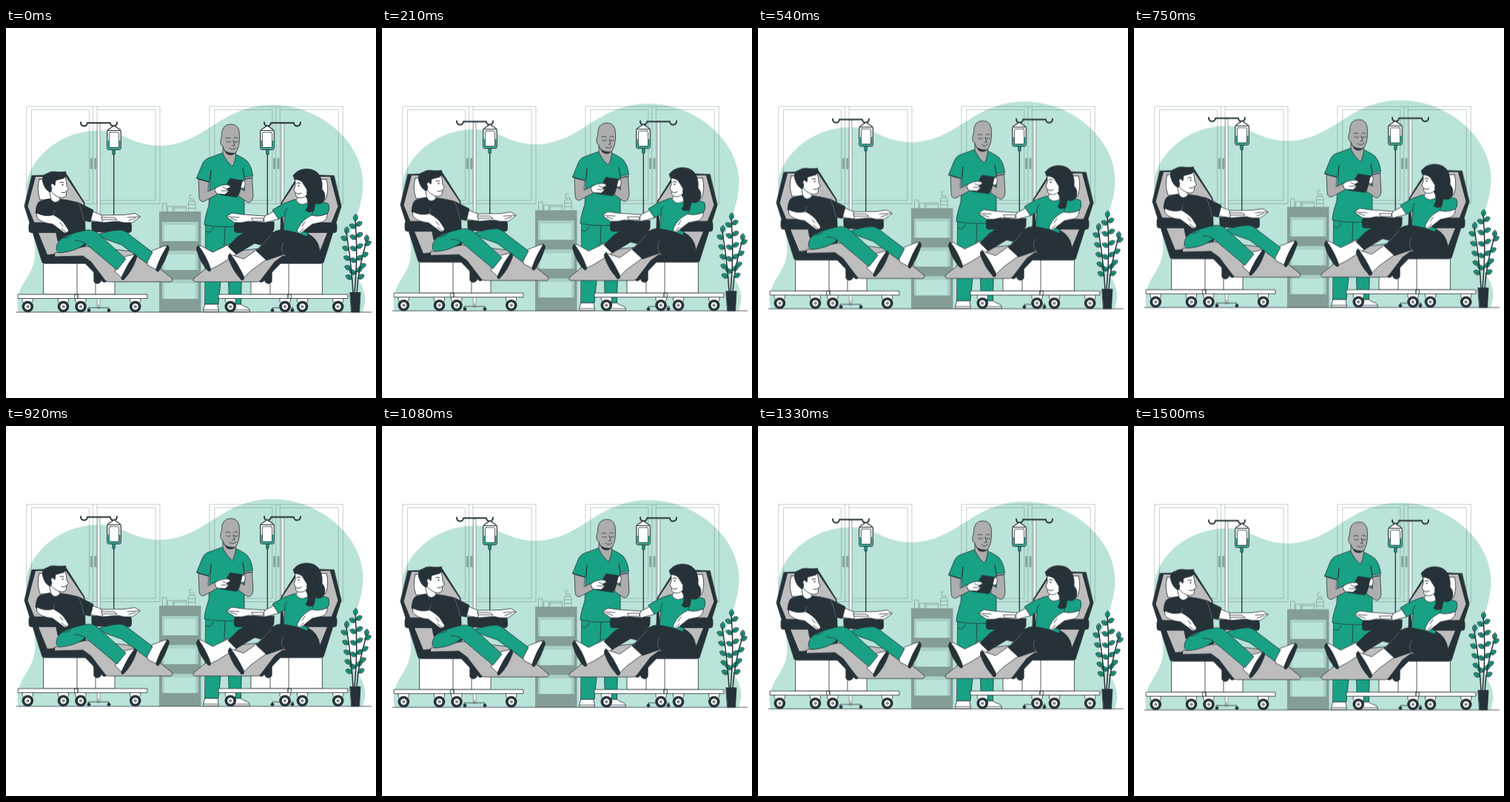
These frames come from a looping animation (500 px wide and 500 px high, 1.54 s). An HTML page:

```html
<!DOCTYPE html>
<html lang="en">
<head>
<meta charset="utf-8">
<title>Blood donation</title>
<style>
  html, body { margin: 0; width: 100%; height: 100%; overflow: hidden; background: #fff; }
  svg { display: block; width: 100%; height: 100%; }
  .bob { animation: bob 770ms linear infinite alternate; }
  @keyframes bob { from { transform: translateY(0); } to { transform: translateY(-6.5px); } }
  .art { stroke: #263238; stroke-width: .8; stroke-linejoin: round; stroke-linecap: round; }
  .d { fill: #263238; }
  .g { fill: #18a184; }
  .w { fill: #fff; }
  .s { fill: #bdbdbd; }
  .k { fill: #adadad; }
  .n { fill: none; }
  .flat { stroke: none; }
  .cabinet { fill: none; stroke: #263238; stroke-opacity: .27; stroke-width: .9; }
  .cart { fill: #849d96; }
  .items { fill: none; stroke: #849d96; stroke-width: .8; }
</style>
</head>
<body>
<svg viewBox="0 0 500 500">
  <defs>
    <g id="cabinet" class="cabinet">
      <path d="M27.700 106H208V237.500H27.700ZM117.500 106V237.500M123 106V237.500M34.500 110.500H112.500V233H34.500ZM123 110.500H202V233H123"/>
      <path d="M115.300 177V189.500M120.700 177V189.500" stroke-width="3" stroke-linecap="round" stroke-opacity=".36"/>
    </g>

    <g id="caster">
      <path class="w" d="M-7 -11H7V-7L4 -3H-5L-7 -7Z"/>
      <circle r="6" class="w" stroke-width="3.600"/>
      <circle r="1.500" class="s"/>
    </g>

    <g id="stand">
      <path class="w" d="M123.700 129H127V379H123.700Z" stroke="#7b8b88"/>
      <path class="n" d="M101 127.500C101 134 110 134 110 128.300H141C141 134 150 134 150 127.500" stroke-width="1.900"/>
      <path class="n" d="M111 380V378H139V380M125 374V378"/>
      <circle class="d" cx="112" cy="381.500" r="2"/><circle class="d" cx="139" cy="381.500" r="2"/>
      <path class="w" d="M146 132L153.500 137Q155.300 138 155.300 140V161Q155.300 164.500 152.500 164.500H139.500Q136.700 164.500 136.700 161V140Q136.700 138 138.500 137Z" stroke-width="1.200"/>
      <path class="n" d="M138 138.500H154" stroke-width="1"/>
      <path class="g flat" d="M137.500 152H154.500V161Q154.500 163.800 152 163.800H140Q137.500 163.800 137.500 161Z"/>
      <rect class="w" x="139.400" y="141" width="13.200" height="20.500" rx="1.500"/>
      <rect class="g" x="143.800" y="164.500" width="3.600" height="6.500" rx="1"/>
      <path class="n" d="M145.700 171V257" stroke-width="1.300"/>
    </g>

    <g id="chair">
      <path class="d" d="M35 199.500L82 198L106 236L108 304L56 319L49 317L25 241Z"/>
      <path class="s flat" d="M40 201H81L105 237L100 302L57 309L29.500 241Z"/>
      <path class="w" d="M45 204.500H60L70 232H46Q41 218 45 204.500Z"/>
      <path class="w" d="M51 318H147V360H51Z"/>
      <path class="n" d="M96 318V360M121 340V360"/>
      <path class="d" d="M50 307L110 302L137 340Q136 344.500 131 343L107 318H53Z"/>
      <path class="d" d="M119 330L129 336L128 343Q123 348 119 343Z"/>
      <path class="s" d="M66 304L108 295L180 303L224 338Q227 342.500 222 343H139Q136 343 134 341L115 316L104 308L66 309Z"/>
      <path class="d" d="M116 262H167Q169.500 263 169.500 267V273Q169.500 276.500 166 276.500H142L120 275.500Q116 275 116 272Z"/>
      <path class="w" d="M16.500 360H97V365.500H16.500ZM93 360H191V365.500H93Z"/>
      <path class="n" d="M97 360V365.500"/>
      <use href="#caster" x="29.300" y="376.500"/><use href="#caster" x="77.500" y="376.500"/>
      <use href="#caster" x="101" y="376.500"/><use href="#caster" x="174.700" y="376.500"/>
    </g>

    <path id="rest" class="d" d="M31 266Q31 263 34 263H71Q75 263 75 267V273Q75 276.500 72 276.500H34Q31 276.500 31 273Z"/>
  </defs>

  <g class="bob">
    <path fill="#bae3d9" d="M17 384C12 366 20 350 28 338C38 322 40 312 39 296C37 270 28 250 28 215C28 184 66 139 126 138.500C157 138.500 170 159 208 159C270 158 290 104 360 104C425 104 482.500 155 482.500 210C482 250 461 275 461 300C461 330 489 345 485 372L482 384Z"/>
  </g>

  <use href="#cabinet"/>
  <use href="#cabinet" x="247.300"/>

  <g class="bob">
    <!-- trolley -->
    <path fill="#a8cfc5" d="M211 261H259V366H211Z"/>
    <path fill="#bae3d9" d="M214 266H256V288H214ZM214 306H256V327H214ZM214 345H256V366H214Z"/>
    <path class="cart" d="M207 248H263.500V384H207ZM211 262V288H259.500V262ZM211 301V327H259.500V301ZM211 340V366H259.500V340Z" fill-rule="evenodd"/>
    <path class="items" d="M211.500 248V237H217V248M218.500 248V241H225.500V248M227 248V241H243.500V248M227 243H243.500M246.500 247V236Q246.500 234 248.500 234H254Q256 234 256 236V247M249 234V231H254V234M248 231V226H252M246.500 238.500H256M246.500 243.500H256"/>

    <g class="art">
      <path class="n" d="M14 384H493.500"/>
      <use href="#stand"/>
      <use href="#stand" transform="translate(499 0) scale(-1 1)"/>

      <!-- nurse -->
      <g>
        <path class="w" d="M269 373H286L287.500 383.500H266.500Q266.500 379 269 373ZM304 373H317Q320 376 327 378Q329.500 380 329.500 383.500H304Z"/>
        <path class="n" d="M267 381H287M305 381H329"/>
        <path class="g" d="M270 262H320L317.500 373H301.500L299 293H295L287 373H269Z"/>
        <path class="n" d="M296 268L295 293M270 275Q277 279 280 270"/>
        <path class="g" d="M292 169L273 176Q267 178 264 187L257.500 203L274 208L276 203L274 240Q268 258 268 266Q294 271 322 267V202L333.500 200Q332 187 326 180Q322 176 311 171Z"/>
        <path class="k" d="M260.500 204.500L274 208L273 221L285 215L289 223L267 234.500Q261 235 261 228ZM322 204.500L332.500 202.500L334 227Q333 236 327 236L314 227L317 217L322 220Z"/>
        <path class="n" d="M276 203L277 192M322 202L320 190M257.500 203L274 208M322 204L333.500 202" stroke-width="1.200"/>
        <path class="k" d="M293 160V170Q299 182 306 187Q310 181 311 166Z"/>
        <path class="k" d="M291.500 146Q291 130 304 130Q316 130 315.500 146Q316 163 309 170Q302 174 295 165L293 160Q289 158 290 152Z"/>
        <path class="d flat" d="M294 164Q300 170 309.500 168.500Q304 174 298 170Z"/>
        <path class="n" d="M297 149Q300 147 303 149M308 148.500Q311 147 313 149M298 153.500Q301 155.500 303.500 153.500M308.500 153.500Q311 155.500 313.500 153.500M307 152L309 159H306M302 162.500Q307 166 311 161.500" stroke-width=".8"/>
        <path class="d" d="M303 203.500L322 206.500L312 228.500L290 225.500Z"/>
        <path class="w" d="M282 217.500Q289 211 301 212L303.500 215L298 217.500L301 220.500L296 225L285 224ZM322 206Q325 211 321 217L317 216L319 208Z"/>
        <path class="n" d="M293 215L298 217.500M291 220H300"/>
      </g>

      <use href="#chair"/>
      <use href="#chair" transform="translate(478 0) scale(-1 1)"/>

      <!-- man -->
      <g>
        <path class="w" d="M112 246L130 253L160 252.500L174 250.500L181.500 255L171 263H159L151 261L132 263L113 260Z"/>
        <path class="n" d="M164 256L180 255M166 260L175 257M129 253Q132 258 130 262.500"/>
        <path class="w" d="M129 256H146L150 259H130Z"/>
        <path class="w" d="M189 309L197 301L214 294.500Q219 294 219 298L206 328L192 321Z"/>
        <path class="d" d="M218 294Q221.500 295 220 300Q215 316 206 329Q202 329 203 325Q208 310 218 294Z"/>
        <path class="g" d="M124 279Q146 272 156 273Q164 275 169 281L198 303L190 318L156 293L136 286Z"/>
        <path class="w" d="M148 322L160 309L173 306Q176 307 175 311L159 340L148 330Z"/>
        <path class="d" d="M174 306Q178 307 176 312Q170 329 159 340Q154 342 157 335Q164 319 174 306Z"/>
        <path class="d" d="M57 231L46 234Q41 236 40 250L45 255L63 253L70 288L106 277L105 260L114 262L118 246L98 236Q83 232 71 231Z"/>
        <path class="g" d="M68 300Q67 290 77 283Q95 275 110 273Q120 272 127 280L162 312L150 327L107 291Q96 302 72 304Z"/>
        <path class="n" d="M107 291Q101 287 93 287M77 284Q85 284 88 280"/>
        <path class="w" d="M58 219L61 232Q66 239 73 232L71 226Z"/>
        <path class="w" d="M60 206Q68 198 80 201Q82 208 82 213L84.500 218L82 220L81 227Q77 231 70 228Q61 224 58 214Z"/>
        <path class="d" d="M49.500 207Q48 198 56 196.500Q61 193 69 194.500Q76 195 80.500 194Q82.500 200 78 203L67 206L66 213L63 210Q59 211 62 217L60 222Q52 219 49.500 207Z"/>
        <path class="n" d="M73 209Q76 207 78 209M75 222Q79 224 81 221" stroke-width="1"/>
        <circle class="d flat" cx="76.500" cy="212" r="1"/>
      </g>
      <use href="#rest"/>
      <path class="w" d="M42 250Q53 256 64 252.500Q76 259 80 266L84.500 273Q84 277 79 277L71 271L63 265Q46 263 42 256Z"/>
      <path class="n" d="M73 263L77 268M75 271L81 276"/>
      <path class="n" d="M98 237Q103 246 105 260M64 253L66 246" stroke="#697478"/>

      <!-- woman -->
      <g>
        <path class="w" d="M368 245L350 254L320 252L305 250L297.500 255L309 263H319L328 261L350 263L369 258Z"/>
        <path class="n" d="M315 256L299 255M312 260L304 257M350 254Q347 258 349 262.500"/>
        <path class="w" d="M332 257H348V261H334Z"/>
        <path class="w" d="M303 292L314 304L287 321L273 328L259 298Q260 293 265 295L279 303Z"/>
        <path class="d" d="M260 294Q256.500 296 258 301Q263 318 273 328Q278 330 276 324Q270 307 260 294Z"/>
        <path class="d" d="M366 276L328 275Q319 277 313 282L300 295L311 306L336 291L360 297Z"/>
        <path class="w" d="M340 299L353 312L331 328L318 341L301 310Q302 305 306 307L321 312Z"/>
        <path class="d" d="M303 305Q299 307 301 312Q307 329 318 340Q323 342 321 335Q313 318 303 305Z"/>
        <path class="d" d="M408 278Q421 284 424 300Q424 311 416 313Q393 315 375 306L352 314L338 301L358 280Q363 272 374 273Z"/>
        <path class="n" d="M376 306Q369 299 375 290M340 300L358 280" stroke="#697478"/>
        <path class="g" d="M389 232Q374 236 360 246L368 258L377 254L375 273Q391 275 407 282L412 258L434 251Q438 247 436 238Q433 235 412 233Z"/>
        <path class="n" d="M377 254Q376 247 380 243M412 258L415 247"/>
        <path class="w" d="M396 225L392 233Q397 242 408 236L410 218Z"/>
        <path class="d" d="M388.500 199Q394 191 405 190.500Q420 190 425 202Q428 209 427 218Q433 224 430 233Q426 240 418 237Q417 241 416 247Q408 251 405 246Q410 241 407 231Z"/>
        <path class="w" d="M391 204Q400 200 406 207L409 222Q404 231 396 229.500Q391 229 391 222L389 219L391 213Z"/>
        <path class="d" d="M388.500 199Q400 192 412 200L420 215L411 231Q405 225 407 219Q404 214 402 211Q400 205 390 204.500Z"/>
        <path class="n" d="M393 210Q395 208 398 210M392 223Q395 226 399 223" stroke-width="1"/>
        <circle class="d flat" cx="395.500" cy="213" r="1"/>
      </g>
      <use href="#rest" transform="translate(478 0) scale(-1 1)"/>
      <path class="w" d="M434 251Q435 258 428 262L414 265L405 272L398 277.500Q393 277 393.500 273L398 265Q404 257 413 253Q423 256 434 251Z"/>
      <path class="n" d="M404 262L400 268M402 271L397 276"/>

      <g id="plant"></g>
      <path class="d" d="M465 357.500H479L477.500 384H467Z"/>
    </g>
  </g>
</svg>
<script>
  // Each stem: root, bend, tip, leaf pairs
  const stems = [
    [[471, 358], [476, 305], [472, 261], 5],
    [[469, 358], [467, 320], [460, 278], 5],
    [[474, 358], [476, 325], [487, 289], 4]
  ];
  const leaf = (x, y, angle) =>
    `<path class="g" transform="translate(${x} ${y}) rotate(${angle})" d="M0 0C2 -4 7 -4 9.500 0C7 4 2 4 0 0ZM0 0H6"/>`;
  const at = (a, b, c, t) => (1 - t) ** 2 * a + 2 * t * (1 - t) * b + t * t * c;

  let art = "";
  for (const [root, bend, tip, pairs] of stems) {
    art += `<path class="n" stroke-width="1.500" d="M${root}Q${bend} ${tip}"/>`;
    for (let i = 0; i < pairs; i++) {
      const t = .25 + .65 * i / (pairs - 1);
      const x = at(root[0], bend[0], tip[0], t), y = at(root[1], bend[1], tip[1], t);
      if (tip[0] < 480) art += leaf(x, y, -155);
      if (tip[0] > 465) art += leaf(x, y - 3, -28);
    }
    art += leaf(...tip, -85);
  }
  document.getElementById("plant").innerHTML = art;
</script>
</body>
</html>
```
